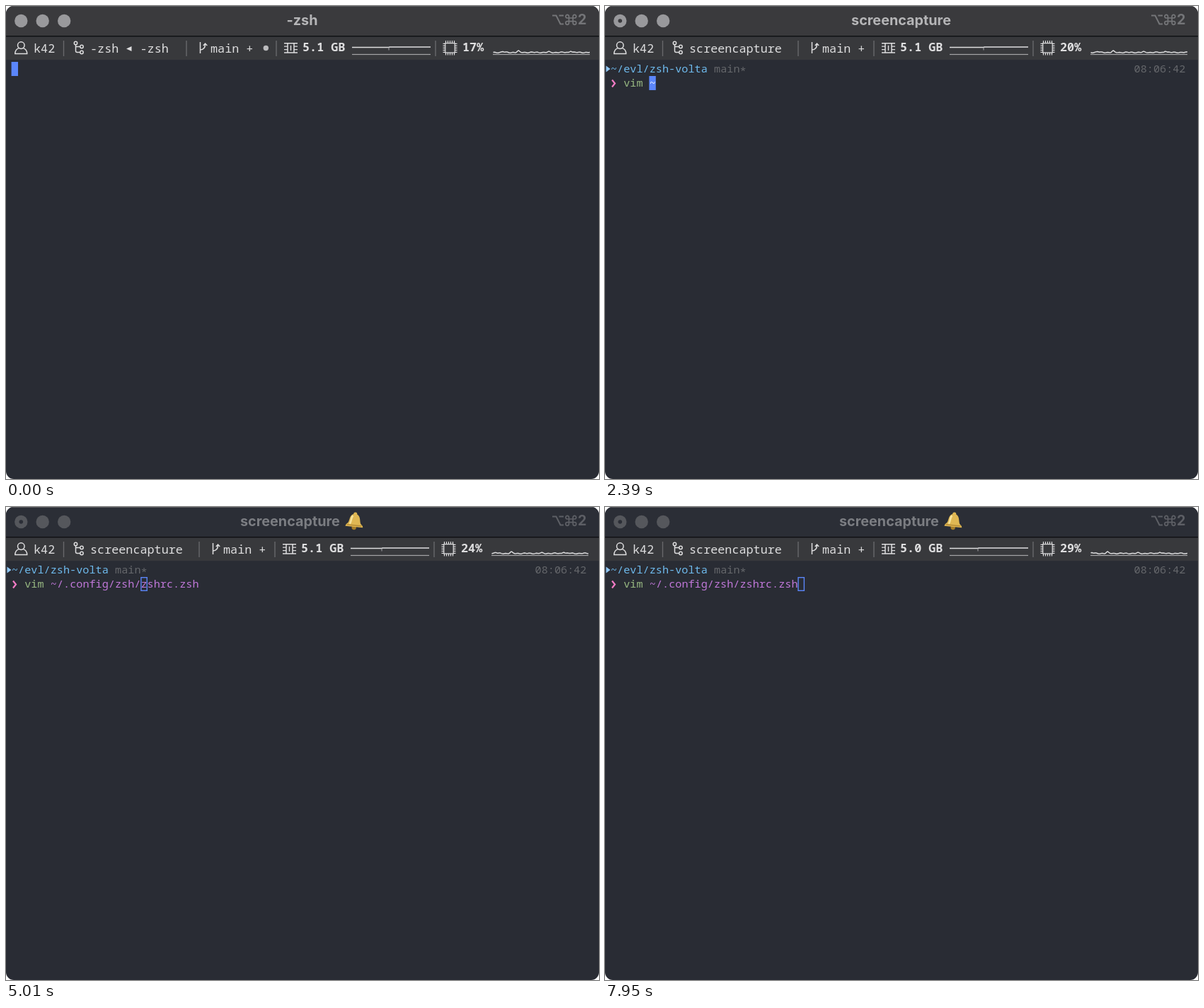
Recreate the animation shown at these times as an HTML page. Size 838x669 px, loop 8 s.

```html
<!DOCTYPE html>
<html lang="en">
<head>
<meta charset="utf-8">
<title>Terminal completion</title>
<style>
html, body { margin: 0; width: 100%; height: 100%; overflow: hidden; background: #fff; }
svg { display: block; width: 100%; height: 100%; }
text { white-space: pre; }
.title { font: 700 19.8px Inter, sans-serif; }
.bar { font: 500 16.8px "Noto Sans Mono", monospace; fill: #dededf; }
.num { font-weight: 600; }
.term { font: 400 15.217px "Noto Sans Mono", monospace; font-variant-ligatures: none; }
.line { fill: none; stroke: #dededf; stroke-width: 1.5; }
.thin { fill: none; stroke: #dededf; stroke-width: 1.2; }
</style>
</head>
<body>
<svg id="stage" viewBox="0 0 838 669" preserveAspectRatio="none"></svg>
<script>
const LOOP = 8000, CELL = 9.13, LEFT = 8;
const GREY = '#a6abb5', PURPLE = '#c078d9', GREEN = '#98b982', RED = '#e06c75';
const BG = '#292c34', CURSOR = '#5b86fa';
const FILES = ['Darwin.zsh', 'Linux.zsh', 'golang.zsh', 'zshrc.zsh', 'zshrc.zsh.patch'];
const DIR = '~/.config/zsh';

const base = {
  title: '-zsh', prompt: false, git: false, dim: false, cmd: '', path: '',
  color: GREY, col: 0, cpu: 17, mem: '5.1', notch: 539, list: false, pick: -1, slash: false
};

// Each entry changes part of the state from its time on.
const steps = [
  [0, {}],
  [100, { prompt: true, col: 2 }],
  [120, { git: true }],
  [530, { title: 'screencapture', notch: 538 }],
  [850, { cpu: 20 }],
  [1570, { notch: 537 }],
  [2100, { cmd: 'v', col: 2, notch: 535 }],
  [2170, { cmd: 'vi', col: 3 }],
  [2250, { cmd: 'vim', col: 4 }],
  [2320, { col: 5 }],
  [2390, { path: '~', col: 6 }],
  [2690, { col: 7, color: PURPLE }],
  [2990, { path: '~/', notch: 533.5 }],
  [3150, { path: '~/.', col: 8, color: GREY }],
  [3550, { path: '~/.c', col: 9, notch: 532, cpu: 24 }],
  [3640, { path: '~/.co', col: 10 }],
  [3720, { path: '~/.con', col: 11 }],
  [3800, { path: '~/.conf', col: 12 }],
  [3870, { path: '~/.confi', col: 13 }],
  [3990, { path: '~/.config', col: 14, color: PURPLE }],
  [4110, { path: '~/.config/', col: 15 }],
  [4320, { path: '~/.config/z', col: 17, color: GREY, notch: 531 }],
  [4420, { path: DIR + '/zshrc.zsh', col: 29, color: PURPLE }],
  [5010, { col: 20, dim: true }],
  [5110, { col: 19 }],
  [5290, { notch: 530 }],
  [5610, { path: DIR + '//zshrc.zsh', col: 20, color: GREY, slash: true, cpu: 26 }],
  [6430, { list: true, notch: 529 }],
  [6560, { path: DIR + '/Darwin.zsh/zshrc.zsh', col: 30, pick: 0, slash: false }],
  [6710, { path: DIR + '/golang.zsh/zshrc.zsh', pick: 1 }],
  [6880, { path: DIR + '/zshrc.zsh/zshrc.zsh', col: 29, pick: 3 }],
  [7160, { list: false, notch: 528 }],
  [7950, { path: DIR + '/zshrc.zsh', color: PURPLE, notch: 527, mem: '5.0', cpu: 29 }]
];

const states = [];
for (const [at, change] of steps) {
  states.push({ ...base, ...states.at(-1), ...change, at });
}

const text = (x, y, s, cls, extra = '') => `<text x="${x}" y="${y}" class="${cls}" ${extra}>${s}</text>`;
const rect = (x, y, w, h, fill, extra = '') =>
  `<rect x="${x}" y="${y}" width="${w}" height="${h}" fill="${fill}" ${extra}/>`;
const path = (d, extra = 'class="line"') => `<path d="${d}" ${extra}/>`;
const move = (x, y, body) => `<g transform="translate(${x} ${y})">${body}</g>`;
const divider = x => rect(x - 0.7, 49, 1.4, 22, '#68686b');
const cellX = col => LEFT + col * CELL;
const term = (col, row, s, fill, extra = '') =>
  text(cellX(col).toFixed(2), 94 + row * 20, s, 'term', `fill="${fill}" ${extra}`);

function bell() {
  return `<g transform="translate(492.7 19.5) rotate(6)">
    <circle cx="0" cy="9.5" r="3.2" fill="#a67c27"/>
    <path d="M0 -12a2.6 2.6 0 0 1 2.6 2.6C8 -7.5 7 0 9 3.5Q12.5 6 12.5 8.5H-12.5Q-12.5 6 -9 3.5C-7 0 -8 -7.5 -2.6 -9.4A2.6 2.6 0 0 1 0 -12Z" fill="#dfb753"/>
    <path d="M-3 -7C-6 -4 -4 2 -6.5 5" fill="none" stroke="#f6e4a0" stroke-width="2.5"/>
    <path d="M-10.5 6.5H10.5" stroke="#b58a34" stroke-width="1.5"/></g>`;
}

function titleBar(s) {
  const light = s.dim ? '#55575c' : '#99999c';
  const keys = s.dim ? '#5d5f65' : '#747578';
  const ink = s.dim ? '#7b7d82' : '#b5b5b7';
  const back = s.dim ? '#2b2e36' : '#3a3a3d';
  let out = rect(0, 0, 838, 42, back) + rect(0, 0, 838, 1, '#58595c') + rect(0, 42, 838, 1.6, '#0f1012');
  for (const x of [21.3, 51.7, 82.2]) out += `<circle cx="${x}" cy="21" r="9.2" fill="${light}"/>`;
  if (s.title !== '-zsh') out += `<circle cx="21.3" cy="21" r="2.8" fill="${back}"/>`;
  out += s.dim
    ? text(331, 27.3, s.title, 'title', `fill="${ink}"`) + bell()
    : text(418.5, 27.3, s.title, 'title', `fill="${ink}" text-anchor="middle"`);
  const stroke = width => `fill="none" stroke="${keys}" stroke-width="${width}"`;
  out += path('M772 13.5H777.5L783.5 25.5H788M781.5 13.5H788', stroke(2));
  out += path('M795.5 17V14.8A2.3 2.3 0 1 0 793.2 17H803.5A2.3 2.3 0 1 0 801.2 14.8V24A2.3 2.3 0 1 0 803.5 21.7H793.2A2.3 2.3 0 1 0 795.5 24Z',
    stroke(1.7));
  return out + text(808, 26.3, '2', 'title', `fill="${keys}"`);
}

function userIcon() {
  return '<circle cx="21.3" cy="55.6" r="4.8" class="line"/>' +
    path('M18.2 59.6Q13 61.2 12.8 67.6H29.8Q29.6 61.2 24.4 59.6');
}

function treeIcon() {
  return '<circle cx="98.5" cy="52.5" r="2.2" class="line"/>' +
    '<circle cx="107" cy="57.5" r="2.2" class="line"/><circle cx="107" cy="65.5" r="2.2" class="line"/>' +
    path('M98.5 55V63.5Q98.5 65.5 100.5 65.5H104.5M98.5 57.5H104.5');
}

function branchIcon(x) {
  return move(x, 50, path('M1.5 1V17M1.5 12Q8.5 11.5 8.5 4M5.8 6L8.5 3L11.2 6'));
}

function memoryIcon() {
  return path('M391 52.8H410M391 66H410M396 52.8V66M405 52.8V66') +
    path('M391 57.2H396M391 61.6H396M405 57.2H410M405 61.6H410', 'class="thin"') +
    path('M400.5 55.8V63');
}

function chipIcon() {
  let pins = '';
  for (let d = -6; d <= 6; d += 3) {
    pins += `M${625.5 + d} 49V53M${625.5 + d} 66V69.5M615.5 ${59.3 + d}H619M632 ${59.3 + d}H635.5`;
  }
  return path(pins, 'class="thin"') + rect(618.8, 52.6, 13.4, 13.4, 'none', 'class="thin"');
}

function cpuLine(notch) {
  const shift = notch - 537, peaks = [[698, 1.2], [720, 2], [763, 0.8], [794, 2.2]];
  const pts = [];
  for (let x = 686.5; x <= 823; x += 1.5) {
    const u = x - shift;
    let y = 65.6 + 0.4 * Math.sin(u * 0.73) + 0.35 * Math.sin(u * 0.31 + 1);
    for (const [p, h] of peaks) y -= h * Math.exp(-(((u - p) / 2) ** 2));
    pts.push(`${x} ${y.toFixed(2)}`);
  }
  return path('M' + pts.join('L'), 'class="line" stroke-linejoin="round"');
}

function statusBar(s) {
  const first = s.title === '-zsh';
  const gitX = first ? 273 : 291;
  let out = rect(0, 43.6, 838, 32.6, '#38393c') + userIcon() + text(39, 65.5, 'k42', 'bar') +
    divider(81.5) + treeIcon();
  out += first
    ? text(119, 65.5, '-zsh', 'bar') + path('M170 60.5L177.5 57V64Z', 'fill="#dededf"') + text(189.5, 65.5, '-zsh', 'bar')
    : text(119, 65.5, s.title, 'bar');
  out += divider(gitX - 18) + branchIcon(gitX) + text(gitX + 16, 65.5, 'main +', 'bar');
  if (first) out += '<circle cx="367.3" cy="59.5" r="3.7" fill="#bbbbbd"/>';
  const n = s.notch;
  const meters = divider(380) + memoryIcon() + text(417, 64.2, s.mem + ' GB', 'bar num') +
    path(`M487 58.5H${n}L${n + 1} 58H598`) + rect(n - 0.5, 58.5, 1, 4, '#a5a5a7') +
    rect(487, 67.9, 111, 1.2, '#a5a5a7') +
    divider(605) + chipIcon() + text(643, 64.2, s.cpu + '%', 'bar num') +
    cpuLine(n) + rect(686, 67.9, 137, 1.2, '#a5a5a7');
  return out + move(first ? 2 : 0, 0, meters);
}

function cursor(s) {
  const row = s.prompt ? 1 : 0, x = cellX(s.col) - 0.4, y = 79 + row * 20;
  if (s.dim) return rect(x + 0.7, y + 0.7, CELL - 0.8, 18.6, 'none', `stroke="${CURSOR}" stroke-width="1.4"`);
  const line = '  ' + (s.path ? s.cmd + ' ' + s.path : s.cmd);
  const under = row ? line[s.col] || '' : '';
  return rect(x, y, CELL + 0.3, 20, CURSOR) + term(s.col, row, under, '#eef2ff');
}

function screen(s) {
  let out = '';
  if (s.prompt) {
    out += path('M1.5 84.5L7.5 89L1.5 93.5Z', 'fill="#91c8f6"');
    out += term(0, 0, '~/evl/zsh-volta', '#6fbbee') + term(81, 0, '08:06:42', '#65676b');
    out += path('M10 104.5L14 109.5L10 114.5', 'fill="none" stroke="#f27bc4" stroke-width="2.2"');
    if (s.git) out += term(16, 0, 'main<tspan dy="3">*</tspan>', '#65676b');
    out += term(2, 1, s.cmd, s.cmd === 'vim' ? GREEN : RED);
    if (s.slash) {
      out += term(6, 1, DIR, s.color) + term(19, 1, '/', '#fff', 'font-weight="700" style="font-weight:700"') +
        term(20, 1, s.path.slice(14), s.color);
    } else {
      out += term(6, 1, s.path, s.color);
    }
  }
  if (s.list) FILES.forEach((name, i) => {
    const on = i === s.pick;
    if (on) out += rect(cellX(i * 17), 119, CELL * 15, 19.6, '#abb1be');
    out += term(i * 17, 2, name, on ? BG : GREY);
  });
  return out + cursor(s);
}

const stage = document.getElementById('stage');
let shown = null;

function draw(now) {
  const t = now % LOOP;
  const s = states.findLast(state => state.at <= t) || states[0];
  if (s !== shown) {
    shown = s;
    stage.innerHTML = '<clipPath id="win"><rect width="838" height="669" rx="11"/></clipPath>' +
      `<g clip-path="url(#win)">${rect(0, 0, 838, 669, BG)}${titleBar(s)}${statusBar(s)}${screen(s)}</g>`;
  }
}

const start = performance.now();
function tick() {
  draw(performance.now() - start);
  requestAnimationFrame(tick);
}
tick();
</script>
</body>
</html>
```
